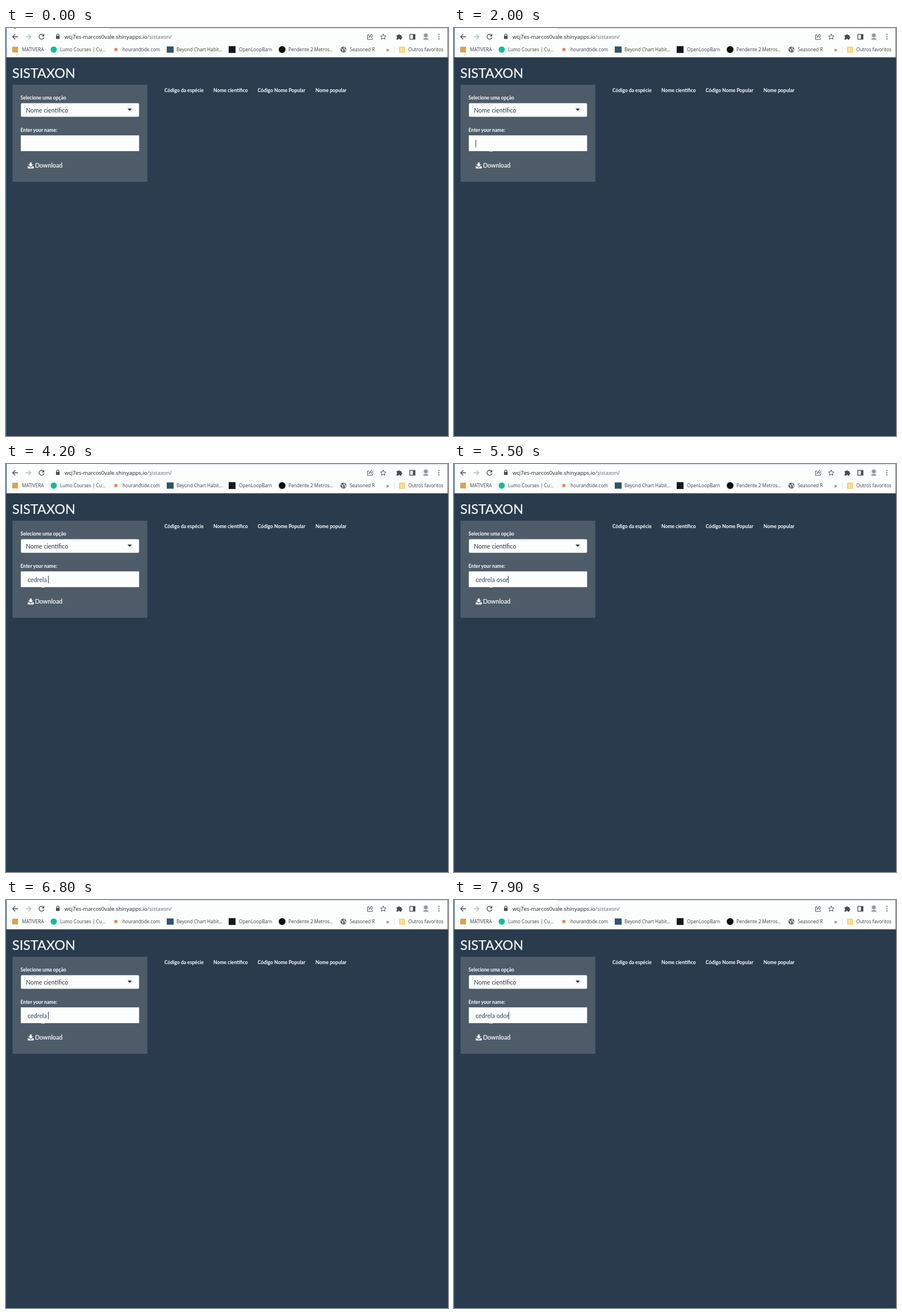
Write an HTML page that moves like this. It is 778x719 px and loops after 8 s.

```html
<!DOCTYPE html>
<html lang="pt">
<head>
<meta charset="utf-8">
<title>SISTAXON</title>
<style>
  html, body { margin: 0; width: 100%; height: 100%; overflow: hidden; background: #2b3d4f; }
  svg { display: block; }
  text { white-space: pre; }
  .page { font-family: Lato, sans-serif; font-size: 10.75px; fill: #fff; }
  .title { font-size: 23.4px; fill: #f4f6f7; }
  .strong { stroke: #fff; stroke-width: .2; }
  .label { font-size: 8.6px; font-weight: 700; }
  .choice { fill: #2f353b; }
  .field { fill: #34465a; }
  .chrome { font-family: "Open Sans", "Noto Sans", sans-serif; font-size: 8.2px; fill: #3c4043; }
  .url { font-size: 9.45px; fill: #202124; }
  .path { fill: #5f6368; }
  .line { fill: none; stroke: #4a4d51; stroke-width: 1.3; }
  .solid { fill: #4a4d51; }

  #bg { animation: tint 8s step-end infinite; }
  #strip { animation: strip 8s step-end infinite; }
  #edge { animation: edge 8s step-end infinite; }
  @keyframes tint { 0% { fill: #2b3d4f; } 12.5% { fill: #2a3b4e; } }
  @keyframes strip { 0% { opacity: 0; } 12.5% { opacity: 1; } }
  @keyframes edge { 0% { fill: #2a5f86; } 12.5% { fill: #214a6b; } }
</style>
</head>
<body>
<svg width="778" height="719" viewBox="0 0 778 719">
  <rect id="bg" width="778" height="719" fill="#2b3d4f"/>
  <rect id="strip" y="715" width="778" height="4" fill="#223b58"/>

  <!-- browser toolbar -->
  <rect width="778" height="51" fill="#fcfdfd"/>
  <rect x="182" width="596" height="1.5" fill="#dee1e6"/>
  <rect y="51" width="778" height="1" fill="#a9b1b9"/>
  <rect x="777" width="1" height="52" fill="#5d7f9a"/>
  <rect id="edge" width="1" height="719"/>
  <g class="line">
    <path d="M21 15.5H12M16.2 11L11.7 15.5L16.2 20"/>
    <path d="M34.5 15.5H43.5M39.3 11L43.8 15.5L39.3 20" stroke="#b5b8bc"/>
    <path d="M66 12.6A4.4 4.4 0 1 0 66.8 16.8"/>
    <path d="M89.2 14V12.6A2 2 0 0 1 93.2 12.6V14" stroke-width="1.1"/>
    <path d="M639 12.5H636.3V20H645V17.5" stroke-width="1"/>
    <path d="M638.8 17C639 14 641 12.8 643 12.8V10.7L646.3 13.8L643 16.8V14.8C641 14.8 639.8 15.6 638.8 17Z" stroke-width=".9"/>
    <path d="M664 10.5L665.4 13.8L669 14.1L666.3 16.4L667.1 19.9L664 18L660.9 19.9L661.7 16.4L659 14.1L662.6 13.8Z" stroke-width="1"/>
    <rect x="710.8" y="11.3" width="9" height="8.4"/>
  </g>
  <g class="solid">
    <path d="M67.3 10.2V14.8H62.8Z"/>
    <rect x="88" y="13.8" width="6.4" height="5.4" rx=".8"/>
    <path d="M687.5 12.5H690.2A1.5 1.5 0 1 1 693.2 12.5H696V15A1.5 1.5 0 1 1 696 18V20.5H693.3A1.5 1.5 0 0 0 690.3 20.5H687.5V17.8A1.5 1.5 0 0 0 687.5 14.9Z"/>
    <rect x="716.2" y="11" width="4" height="9"/>
    <circle cx="762" cy="11.6" r="1"/><circle cx="762" cy="15.4" r="1"/><circle cx="762" cy="19.2" r="1"/>
  </g>
  <circle cx="738.5" cy="15" r="6.5" fill="#eceeef"/>
  <g fill="#8f9296">
    <circle cx="739" cy="13" r="3.2"/>
    <path d="M734 20.5Q739 14 744 20.5Z"/>
  </g>

  <g class="chrome">
    <text class="url" x="103" y="18.8">wcj7es-marcos0vale.shinyapps.io<tspan class="path">/sistaxon/</tspan></text>
    <text x="28" y="41">MATIVERA</text>
    <text x="95" y="41">Lumo Courses | Cu...</text>
    <text x="205" y="41">hourandtide.com</text>
    <text x="300" y="41">Beyond Chart Habit...</text>
    <text x="410" y="41">OpenLoopBarn</text>
    <text x="497" y="41">Pendente 2 Metros...</text>
    <text x="605" y="41">Seasoned R</text>
    <text x="669" y="41.5" font-size="11">»</text>
    <text x="708" y="41">Outros favoritos</text>
  </g>
  <rect x="11" y="33" width="10" height="10" fill="#e2a04a"/>
  <circle cx="84" cy="38" r="5.5" fill="#14bf96"/>
  <circle cx="193.5" cy="38" r="3" fill="#e58a5c"/>
  <rect x="283" y="32.5" width="12" height="11" fill="#2d5470"/>
  <rect x="392" y="32" width="12" height="12" fill="#16161e"/>
  <circle cx="486" cy="38" r="6" fill="#0c0c0c"/>
  <circle cx="594" cy="38" r="5.3" fill="#5f6368"/>
  <path d="M590 36.2L593 38L592.6 41.8M595.5 33.8L594.8 36.2L598 38.2L596.6 41" fill="none" stroke="#fcfdfd" stroke-width="1.3"/>
  <rect x="683" y="32" width="1" height="12" fill="#d5d8dc"/>
  <rect x="692.5" y="33.5" width="9" height="9.5" fill="#fde08a" stroke="#efc95a"/>

  <!-- app page -->
  <rect x="11.5" y="100" width="237.2" height="171" fill="#4e5c6a"/>
  <rect x="26.3" y="132.6" width="207.9" height="24" rx="2" fill="#fcfdfd"/>
  <path d="M214 142H221.6L217.8 146Z" fill="#25303b"/>
  <rect x="26" y="189.2" width="208.3" height="27.8" fill="#fcfdfd"/>
  <path d="M41.7 237H45.3V240.5H48L43.5 244.5L39 240.5H41.7ZM38.2 243.7H40.8L43.5 246.2L46.2 243.7H48.8V247.5H38.2Z" fill="#fff"/>
  <g class="page">
    <text class="title strong" x="11" y="88">SISTAXON</text>
    <text class="label" x="25.5" y="126">Selecione uma opção</text>
    <text class="choice" x="35" y="148.7">Nome científico</text>
    <text class="label" x="25.5" y="183">Enter your name:</text>
    <text id="typed" class="field" x="38" y="207.5"></text>
    <text class="strong" x="51" y="246">Download</text>
    <text class="label" x="278.7" y="113">Código da espécie</text>
    <text class="label" x="365" y="113">Nome científico</text>
    <text class="label" x="443" y="113">Código Nome Popular</text>
    <text class="label" x="544.7" y="113">Nome popular</text>
  </g>
  <rect id="caret" y="197" width="1" height="13" fill="#2b3e50"/>

  <path id="arrow" d="M0 0V12.5L2.9 9.9L4.9 14.6L6.9 13.7L4.9 9.2H8.8Z" fill="#fff" stroke="#222" stroke-width=".8"/>
  <path id="beam" d="M62 217.5H64.3L65 216.8L65.7 217.5H68" fill="none" stroke="#d3d8dc"/>
</svg>
<script>
  const LOOP = 8000;
  const MOVE_START = 300, MOVE_END = 800, STEP = 100;
  const TEXT_X = 38;

  // [start ms, field text, caret visible]
  const states = [
    [0, "", false],
    [1000, "", true],
    [1500, "", false],
    [2000, "", true],
    [2200, "c", true],
    [2400, "ce", true],
    [2900, "ced", true],
    [3100, "cedr", true],
    [3200, "cedre", true],
    [3400, "cedrel", true],
    [3900, "cedrel", false],
    [4100, "cedrela", true],
    [4200, "cedrela ", true],
    [4700, "cedrela ", false],
    [4800, "cedrela o", true],
    [5200, "cedrela os", true],
    [5300, "cedrela oso", true],
    [5500, "cedrela osor", true],
    [5700, "cedrela osora", true],
    [6000, "cedrela osor", true],
    [6200, "cedrela oso", false],
    [6300, "cedrela os", true],
    [6400, "cedrela o", true],
    [6700, "cedrela ", false],
    [6800, "cedrela ", true],
    [7200, "cedrela ", false],
    [7500, "cedrela od", true],
    [7600, "cedrela odo", true],
    [7900, "cedrela odor", true]
  ];

  const [typed, caret, arrow, beam] =
    ["typed", "caret", "arrow", "beam"].map(id => document.getElementById(id));
  const show = (el, on) => el.setAttribute("visibility", on ? "visible" : "hidden");

  function drawField(t) {
    const [, text, caretOn] = states.findLast(s => s[0] <= t);
    if (typed.textContent !== text) typed.textContent = text;
    const width = text ? typed.getComputedTextLength() : 0;
    caret.setAttribute("x", Math.floor(TEXT_X + width));
    show(caret, caretOn);
  }

  function drawPointer(t) {
    const settled = t >= MOVE_END;
    show(arrow, !settled);
    show(beam, settled);
    const steps = Math.max(0, Math.floor((t - MOVE_START) / STEP) + 1);
    const p = steps * STEP / (MOVE_END - MOVE_START + STEP);
    arrow.setAttribute("transform", `translate(${10 + 52 * p} ${-13.5 + 215 * p})`);
  }

  const start = performance.now();
  function frame() {
    const t = (performance.now() - start) % LOOP;
    drawField(t);
    drawPointer(t);
    requestAnimationFrame(frame);
  }
  frame();
</script>
</body>
</html>
```
